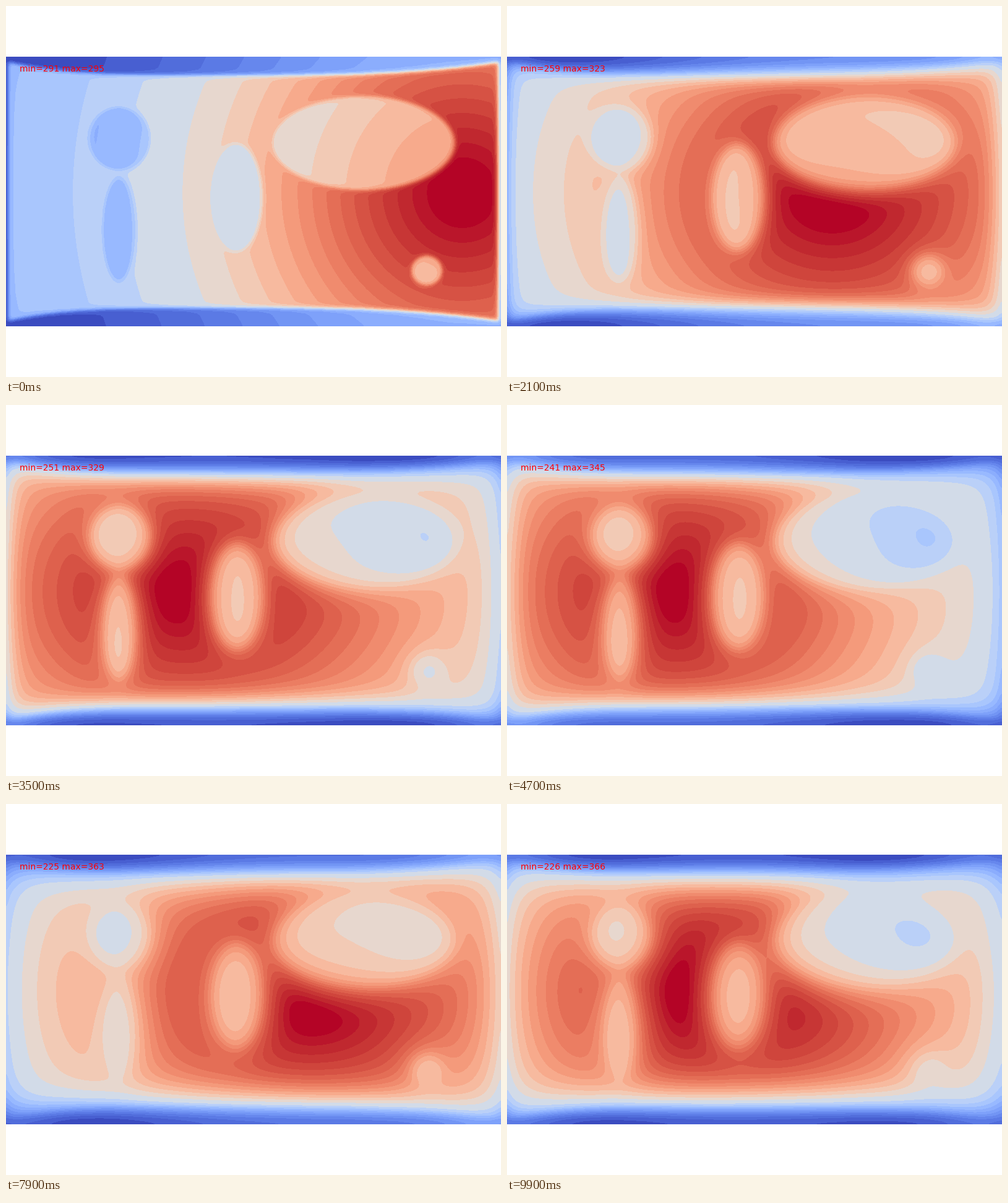
A matplotlib script for the animation above (10 s loop, 800 by 600 pixels).

```python
import numpy as np
import matplotlib.pyplot as plt
from matplotlib.animation import FuncAnimation

W, H = 800, 436.36          # heated plate, in pixels
FRAMES, SUBSTEPS = 100, 8
DIFFUSION = 10              # px^2 per frame
RELAX = 0.008               # pull back towards the starting temperature
START_TEMP = 293
BANDS = 27

x = np.linspace(0, W, 301)
y = np.linspace(0, H, 164)
X, Y = np.meshgrid(x, y)
dx, dy = x[1] - x[0], y[1] - y[0]


def soft(dist):
    """Coverage of a cell whose centre lies dist pixels inside an edge."""
    return np.clip(dist / 4 + 0.5, 0, 1)


def ellipse(cx, cy, a, b):
    r = np.hypot((X - cx) / a, (Y - cy) / b)
    return soft((1 - r) * min(a, b))


# Cool rim: bulging along top and bottom, thin at the sides
crest = 370
rim = 31 - 22 * np.where(X < crest,
                         np.abs(1 - X / crest) ** 4,
                         np.abs((X - crest) / (W - crest)) ** 3)
body = soft(np.minimum(np.minimum(Y, H - Y) - rim,
                       np.minimum(X, W - X) - 4.5))
holes = np.max([ellipse(184, 133, 49, 52),
                ellipse(183, 279, 27, 86),
                ellipse(373, 228, 42, 87),
                ellipse(578, 140, 147, 76),
                ellipse(680, 346, 25, 24)], axis=0)


def blend(rim_value, body_value, hole_value):
    inner = body_value + (hole_value - body_value) * holes
    return rim_value + (inner - rim_value) * body


absorb = blend(1.5, 3.1, 2.3)
loss = blend(2.35, 1.15, 1.5)


def heater(t):
    cx = 400 + 338 * np.cos(0.1 * t)
    return np.exp(-((X - cx) ** 2 + (Y - 220) ** 2) / (2 * 302 ** 2))


def simulate():
    temp = np.full(X.shape, float(START_TEMP))
    dt = 1 / SUBSTEPS
    states = []
    for i in range(FRAMES):
        for k in range(SUBSTEPS):
            p = np.pad(temp, 1, mode="reflect")
            lap = ((p[1:-1, 2:] + p[1:-1, :-2] - 2 * temp) / dx ** 2
                   + (p[2:, 1:-1] + p[:-2, 1:-1] - 2 * temp) / dy ** 2)
            gain = absorb * heater(i + k * dt) - loss
            cooling = RELAX * (temp - START_TEMP)
            temp = temp + dt * (DIFFUSION * lap + gain - cooling)
        states.append(temp)
    return states


def color_bands(cmap, n):
    """Split a colour map where its red and green have changed equally far."""
    u = np.linspace(0, 1, 256)
    change = np.abs(np.diff(cmap(u)[:, :2], axis=0)) @ [0.3, 1]
    travel = np.append(0, np.cumsum(change))
    stops = np.linspace(0, travel[-1], n + 1)
    edges = np.interp(stops, travel, u)
    colors = cmap((edges[:-1] + edges[1:]) / 2)
    colors[0], colors[-1] = cmap(0.0), cmap(1.0)
    edges[0], edges[-1] = -0.01, 1.01
    return edges, colors


states = simulate()
edges, colors = color_bands(plt.get_cmap("coolwarm"), BANDS)

fig = plt.figure(figsize=(8, 6), dpi=100, facecolor="white")
ax = fig.add_axes([0, (600 - H) / 1200, 1, H / 600])
label = fig.text(22 / 800, 1 - 106 / 600, "", color="red", fontsize=10,
                 family="DejaVu Sans", va="baseline")


def draw(i):
    ax.clear()
    ax.axis("off")
    ax.set_xlim(0, W)
    ax.set_ylim(H, 0)
    low, high = states[i].min(), states[i].max()
    ax.contourf(X, Y, states[i], levels=low + (high - low) * edges,
                colors=colors)
    label.set_text(f"min={low:.0f} max={high:.0f}")
    return []


anim = FuncAnimation(fig, draw, frames=FRAMES, interval=100,
                     init_func=lambda: draw(0), repeat=True, repeat_delay=0)
plt.show()
```
